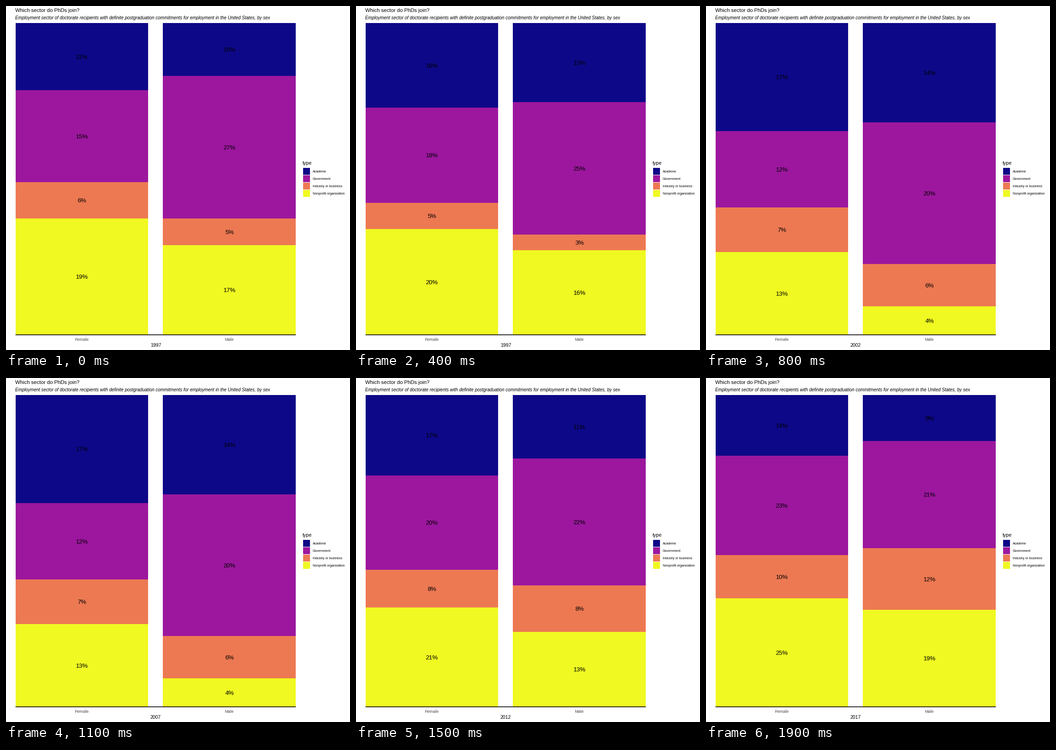
Write a matplotlib script that moves like this. It is 748x748 px and loops after 2 s.

```python
import matplotlib.pyplot as plt
from matplotlib.animation import FuncAnimation
from matplotlib.patches import Rectangle

SIZE = 748
FRAMES, INTERVAL, HOLD = 20, 100, 4
TOP, BOTTOM = 37, 714.8
BAR_X, BAR_W = (20.7, 341.5), 288.7

SECTORS = [
    ("Academe", "#0D0887"),
    ("Government", "#9C179E"),
    ("Industry or business", "#ED7953"),
    ("Nonprofit organization", "#F0F921"),
]
YEARS = [1997, 2002, 2007, 2012, 2017]
# One (female, male) pair per state, sectors from top to bottom
SHARES = [
    ((11, 15, 6, 19), (10, 27, 5, 17)),
    ((16, 18, 5, 20), (15, 25, 3, 16)),
    ((17, 12, 7, 13), (14, 20, 6, 4)),
    ((17, 20, 8, 21), (11, 22, 8, 13)),
    ((14, 23, 10, 25), (9, 21, 12, 19)),
]

plt.rcParams["font.family"] = "Liberation Sans"
fig = plt.figure(figsize=(SIZE / 72, SIZE / 72), dpi=72, facecolor="white")
ax = fig.add_axes([0, 0, 1, 1])
ax.set_xlim(0, SIZE)
ax.set_ylim(SIZE, 0)
ax.axis("off")


def label(x, y, text, size, **style):
    return ax.text(x, y, text, fontsize=size, va="baseline", **style)


def box(x, y, w, h, color):
    return ax.add_patch(Rectangle((x, y), w, h, facecolor=color,
                                  edgecolor="none", linewidth=0, snap=True))


label(20.5, 13, "Which sector do PhDs join?", 11.35)
label(20.5, 29, "Employment sector of doctorate recipients with definite "
      "postgraduation commitments for employment in the United States, by sex",
      9.72, style="italic")

label(645, 345, "type", 10.6)
for i, (name, color) in enumerate(SECTORS):
    y = 352 + 16.1 * i
    box(646, y, 15, 14.6, color)
    label(666.6, y + 9.8, name, 7.1)

bars, values = [], []
for x, sex in zip(BAR_X, ("Female", "Male")):
    mid = x + BAR_W / 2
    bars.append([box(x, TOP, BAR_W, 0, color) for _, color in SECTORS])
    values.append([label(mid, TOP, "", 13.2, ha="center") for _ in SECTORS])
    label(mid - 0.5, 727.6, sex, 9.3, ha="center", color="#4D4D4D")

ax.plot([20.7, 630.2], [715, 715], color="black", linewidth=1.6,
        solid_capstyle="butt", snap=False)
year = label(325.5, 740.8, "", 10.4, ha="center")


def update(frame):
    shares = SHARES[frame // HOLD]
    for rects, texts, column in zip(bars, values, shares):
        scale = (BOTTOM - TOP) / sum(column)
        y = TOP
        for rect, text, share in zip(rects, texts, column):
            h = share * scale
            rect.set_y(y)
            rect.set_height(h)
            text.set_text(f"{share}%")
            text.set_y(y + h / 2 + 4.8)
            y += h
    # The caption trails the bars by one step
    year.set_text(str(YEARS[max(frame - 1, 0) // HOLD]))
    return []


anim = FuncAnimation(fig, update, frames=FRAMES, interval=INTERVAL,
                     init_func=lambda: update(0), repeat=True, repeat_delay=0)
plt.show()
```
